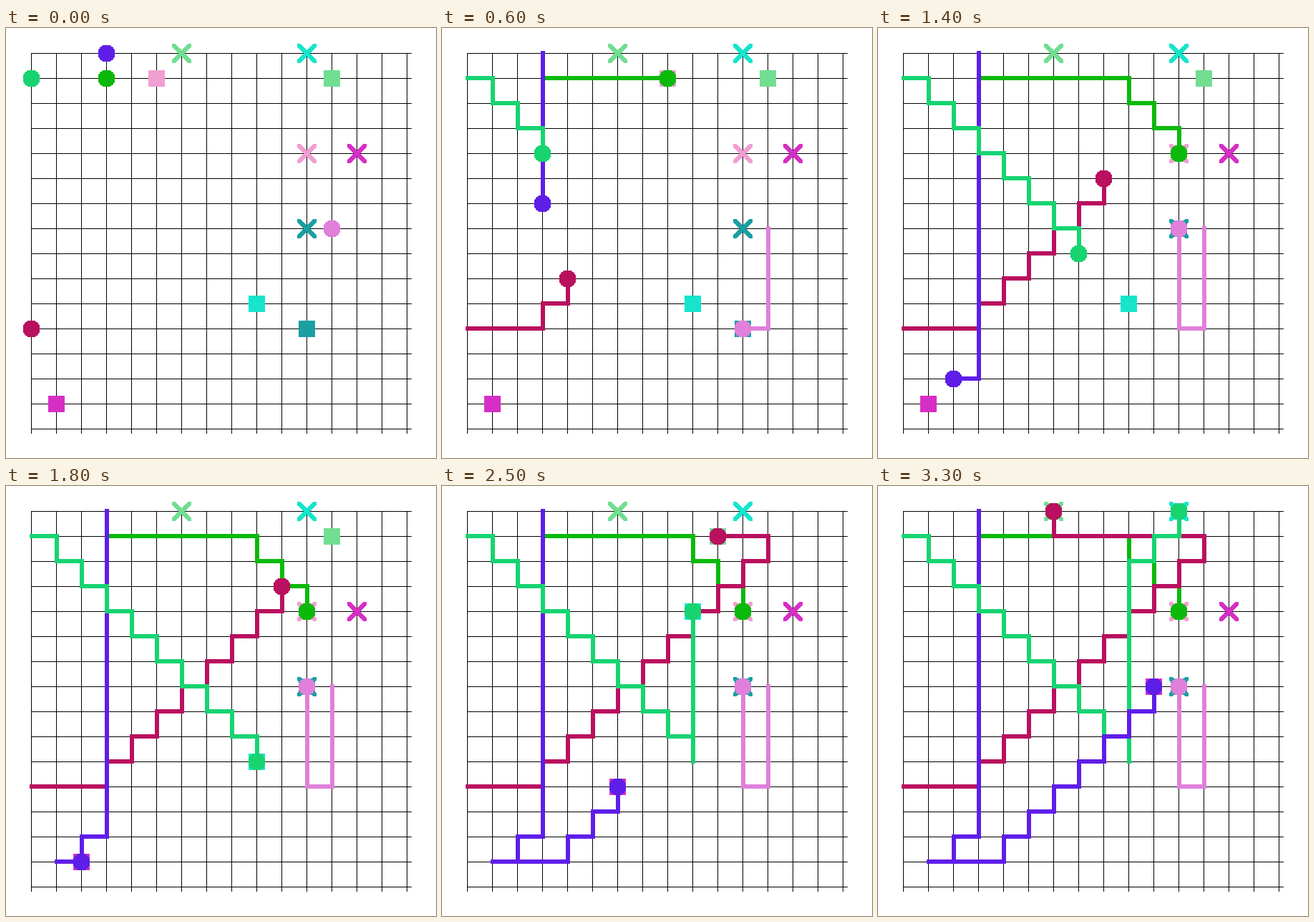
A matplotlib script that plays this animation: 601 by 601 pixels, repeating every 3.4 s.

```python
import matplotlib.pyplot as plt
from matplotlib.animation import FuncAnimation
from matplotlib.patches import Circle, Rectangle

SIZE, CELL, DPI = 601, 35, 72      # at 72 dpi one point is one pixel
FRAMES, INTERVAL = 34, 100
MOVES = {"R": (1, 0), "L": (-1, 0), "U": (0, -1), "D": (0, 1), ".": (0, 0)}

# start cell, colour, route ("." = pick up), parcel cell, drop cell, parcel colour
COURIERS = [
    ((12, 7), "#e080db", "DDDDL.UUUU", (11, 11), (11, 7), "#1a9fa3"),
    ((3, 1), "#0bb90b", "RR.RRRRDRDRD", (5, 1), (11, 4), "#f09fd1"),
    ((0, 11), "#b9105f", "RRRU" + "RU" * 8 + "RU." + "L" * 6 + "U",
     (12, 1), (6, 0), "#72de92"),
    ((0, 1), "#17d471", "RD" * 9 + "." + "U" * 8 + "RURU",
     (9, 10), (11, 0), "#16e5cb"),
    ((3, 0), "#5f1ee8", "D" * 13 + "LDL.RRRU" + "RU" * 6,
     (1, 14), (13, 4), "#d62fc5"),
]


def px(cell):
    return tuple(CELL * (c + 1) + 0.5 for c in cell)


def walk(start, route):
    cells = [start]
    for move in route.ljust(FRAMES - 1, "."):
        dx, dy = MOVES[move]
        x, y = cells[-1]
        cells.append((x + dx, y + dy))
    return cells


fig = plt.figure(figsize=((SIZE + 1e-6) / DPI,) * 2, dpi=DPI, facecolor="white")
ax = fig.add_axes([0, 0, 1, 1])
ax.set(xlim=(0, SIZE), ylim=(SIZE, 0))
ax.axis("off")


def box(x, y, w, h, color, z):
    return ax.add_patch(Rectangle((x, y), w, h, fc=color, lw=0, aa=False, zorder=z))


def stroke(a, b, color, width, z):
    line, = ax.plot(*zip(a, b), color=color, lw=width, aa=False,
                    solid_capstyle="round", zorder=z)
    return line


def cross(cell, color):
    x, y = px(cell)
    for s in (-11, 11):
        stroke((x - 11, y - s), (x + 11, y + s), color, 5, 5)


for i in range(16):
    p = CELL * (i + 1)
    box(p, CELL, 1, 532, "black", 1)
    box(CELL, p, 532, 1, "black", 1)

trails, tokens = [], []
for start, color, route, parcel, drop, tint in COURIERS:
    cells = walk(start, route)
    for t in range(1, FRAMES):
        if cells[t] != cells[t - 1]:
            # later steps cover earlier ones
            line = stroke(px(cells[t - 1]), px(cells[t]), color, 6, 2 + t / 100)
            trails.append((t, line))
    cross(drop, tint)
    square = box(0, 0, 23, 23, tint, 4)
    dot = ax.add_patch(Circle(px(start), 11.5, fc=color, lw=0, aa=False, zorder=6))
    tokens.append((cells, route.index("."), parcel, square, dot))


def update(frame):
    for t, line in trails:
        line.set_visible(t <= frame)
    for cells, pickup, parcel, square, dot in tokens:
        dot.center = px(cells[frame])
        x, y = px(cells[frame] if frame >= pickup else parcel)
        square.set_xy((x - 11.5, y - 11.5))
    return []


anim = FuncAnimation(fig, update, frames=FRAMES, interval=INTERVAL,
                     repeat=True, repeat_delay=0, blit=False)
plt.show()
```
